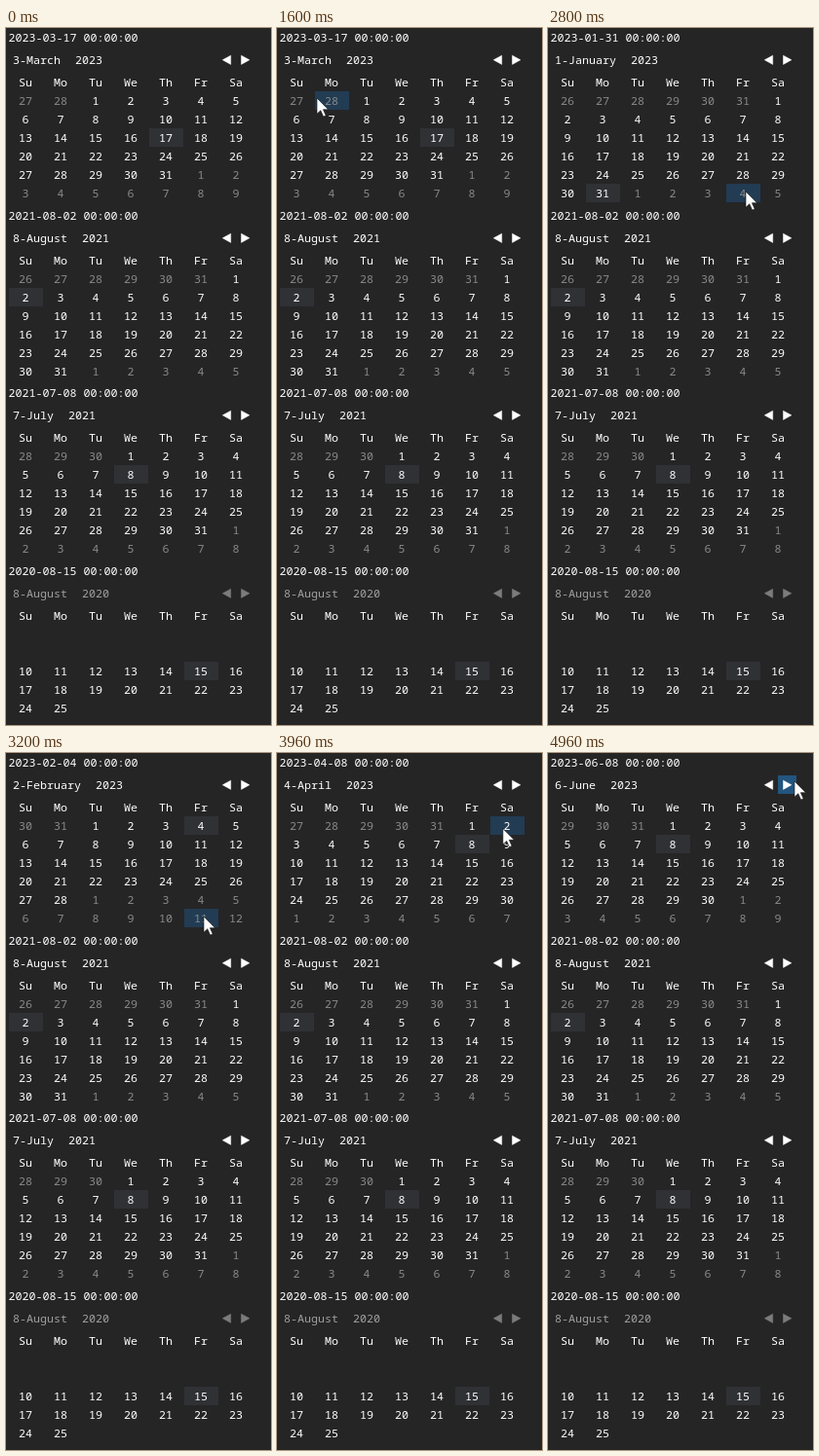
Animation of 272 by 716 pixels, one loop 5 s. Source, as an HTML page:

```html
<!DOCTYPE html>
<html lang="en">
<head>
<meta charset="utf-8">
<title>Date pickers</title>
<style>
  html, body { margin: 0; width: 100%; height: 100%; overflow: hidden; background: #252526; }
  svg { display: block; width: 272px; height: 716px; }
  text { font: 11.667px "Noto Sans Mono", monospace; fill: #fff; white-space: pre; }
  polygon { fill: #fff; stroke: #fff; stroke-width: .5; }
  .mid { text-anchor: middle; }
  .dim { fill: #8a8a8a; }
  text.off { fill: #a0a0a0; }
  polygon.off { fill: #7c7c7c; stroke: #7c7c7c; }
  .sel { fill: #303135; }
</style>
</head>
<body>
<svg id="stage" viewBox="0 0 272 716"></svg>
<script>
const LOOP = 5000, STEP = 40;
const DAYS = ['Su', 'Mo', 'Tu', 'We', 'Th', 'Fr', 'Sa'];
const MONTHS = ['January', 'February', 'March', 'April', 'May', 'June', 'July', 'August'];
const stage = document.getElementById('stage');

function add(parent, tag, attrs, text) {
  const el = document.createElementNS('http://www.w3.org/2000/svg', tag);
  for (const k in attrs) el.setAttribute(k, attrs[k]);
  if (text !== undefined) el.textContent = text;
  parent.appendChild(el);
  return el;
}

const cellX = i => 3 + 36 * (i % 7);
const cellY = i => 65 + 19 * Math.floor(i / 7);

// The grid follows the weekdays of the year before the labelled one.
function monthCells(year, month) {
  const lead = new Date(year - 1, month - 1, 1).getDay();
  return Array.from({ length: 42 }, (_, i) => {
    const d = new Date(year - 1, month - 1, 1 - lead + i);
    return { i, day: d.getDate(), inside: d.getMonth() === month - 1 };
  });
}

function rangeCells(from, to, start) {
  return Array.from({ length: to - from + 1 }, (_, k) => ({ i: start + k, day: from + k, inside: true }));
}

function arrow(g, x, dir, cls) {
  const y = 32.8, tip = x + dir * 4.2, back = x - dir * 4.2;
  add(g, 'polygon', { points: `${tip},${y} ${back},${y - 4.6} ${back},${y + 4.6}`, class: cls });
}

function calendar(top, iso, cells, disabled) {
  const [year, month, day] = iso.split('-').map(Number);
  const g = add(stage, 'g', { transform: `translate(0 ${top})` });
  const head = disabled ? 'off' : '';
  const name = `${month}-${MONTHS[month - 1]}`;
  add(g, 'text', { x: 2.6, y: 14 }, `${iso} 00:00:00`);
  add(g, 'text', { x: 7, y: 37, class: head }, name);
  add(g, 'text', { x: 22 + 7 * name.length, y: 37, class: head }, year);
  arrow(g, 226.5, -1, head);
  arrow(g, 245.7, 1, head);
  DAYS.forEach((d, i) => add(g, 'text', { x: cellX(i) + 17, y: 60, class: 'mid' }, d));
  for (const c of cells || monthCells(year, month)) {
    const x = cellX(c.i), y = cellY(c.i);
    if (c.inside && c.day === day)
      add(g, 'rect', { x, y, width: 35, height: 19, class: 'sel' });
    add(g, 'text', { x: x + 17, y: y + 14, class: c.inside ? 'mid' : 'mid dim' }, c.day);
  }
  return g;
}

const hover = add(stage, 'rect', { height: 19 });

const picks = [
  [0, '2023-03-17'], [1720, '2023-02-28'], [2000, '2023-01-31'], [3080, '2023-02-04'],
  [3320, '2023-03-11'], [3560, '2023-04-08'], [4480, '2023-05-08'], [4920, '2023-06-08']
].map(([at, iso]) => ({ at, el: calendar(0, iso) }));

calendar(183, '2021-08-02');
calendar(365, '2021-07-08');
calendar(548, '2020-08-15', rangeCells(10, 25, 14), true);

const spot = add(stage, 'circle', { r: 15, fill: '#f0f034', 'fill-opacity': .6 });
const cursor = add(stage, 'path', {
  d: 'M0 0V16.2L3.8 12.7L6.6 19L9.2 17.9L6.4 11.7H11.6Z',
  fill: '#fff', stroke: '#111', 'stroke-width': .6
});

const presses = [[1640, 1720], [1920, 2000], [3000, 3080], [3240, 3320], [3480, 3560], [4360, 4480], [4840, 4920]];

const out = p => 1 - (1 - p) * (1 - p);
const inOut = p => p * p * (3 - 2 * p);
const line = p => p;

// start, end, end point, easing
const moves = [
  [400, 760, 145, 186, out], [760, 880, 130, 173, line], [920, 1440, 41, 72, inOut],
  [2440, 2800, 203, 168, inOut], [3720, 4080, 242, 46, inOut], [4120, 4320, 253, 29, out]
];

function pointer(t) {
  let x = 194, y = 660;
  for (const [from, to, ex, ey, ease] of moves) {
    if (t <= from) break;
    const p = ease(Math.min(1, (t - from) / (to - from)));
    x += (ex - x) * p;
    y += (ey - y) * p;
  }
  return [x, y];
}

function hit(x, y) {
  if (y >= 23 && y < 42) {
    if (x >= 236 && x < 255) return [236, 23, 19];
    if (x >= 217 && x < 236) return [217, 23, 19];
  }
  for (const top of [0, 183, 365]) {
    const col = Math.floor((x - 3) / 36), row = Math.floor((y - top - 65) / 19);
    if (col >= 0 && col < 7 && row >= 0 && row < 6) {
      const i = row * 7 + col;
      return [cellX(i), top + cellY(i), 35];
    }
  }
  return null;
}

const show = (el, on) => el.setAttribute('visibility', on ? 'visible' : 'hidden');

function draw(now) {
  const t = Math.floor((now % LOOP) / STEP) * STEP;
  const [x, y] = pointer(t);
  const down = presses.some(([a, b]) => t >= a && t < b);
  picks.forEach((p, i) => show(p.el, t >= p.at && (i + 1 === picks.length || t < picks[i + 1].at)));

  show(cursor, t >= 400);
  cursor.setAttribute('transform', `translate(${x} ${y})`);
  show(spot, down);
  spot.setAttribute('cx', x);
  spot.setAttribute('cy', y + 1.5);

  const box = t >= 1520 && hit(x, y);
  show(hover, box);
  if (box) {
    const [bx, by, w] = box;
    hover.setAttribute('x', bx);
    hover.setAttribute('y', by);
    hover.setAttribute('width', w);
    hover.setAttribute('fill', down ? '#1a4468' : w < 35 ? '#22557f' : '#223c53');
  }
}

function tick() {
  draw(performance.now());
  requestAnimationFrame(tick);
}
tick();
</script>
</body>
</html>
```
